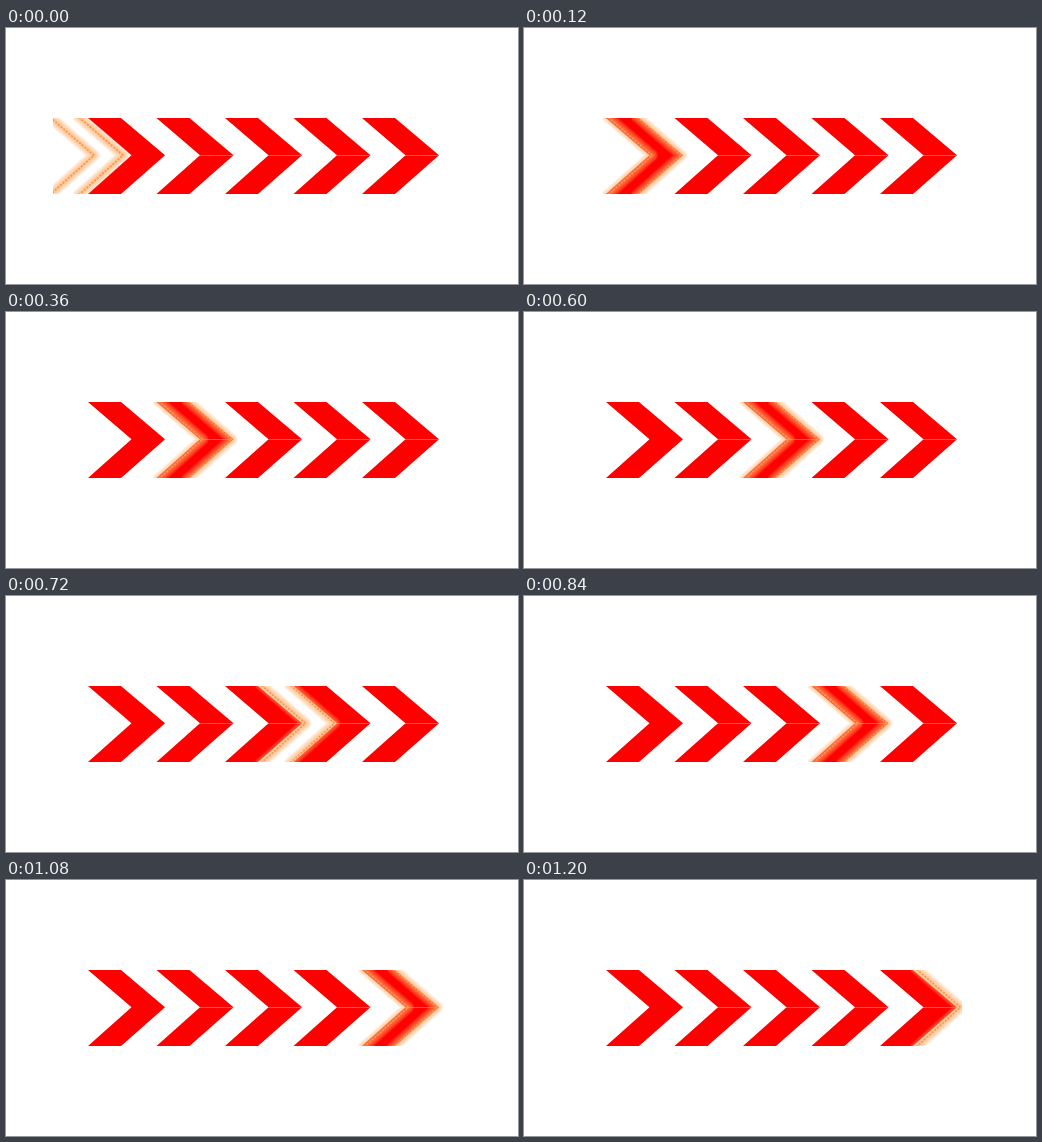
These frames come from a looping animation (512x256 px, 1.32 s). An HTML page with a canvas:

```html
<!DOCTYPE html>
<html>
<head>
<meta charset="utf-8">
<style>
html, body { margin: 0; width: 100%; height: 100%; overflow: hidden; background: #fff; }
canvas { display: block; }
</style>
</head>
<body>
<canvas width="512" height="256"></canvas>
<script>
const ctx = document.querySelector('canvas').getContext('2d');
const TOP = 90, MID = 127.3, BOTTOM = 166;
const PITCH = 68.5, STEP_MS = 120, STEPS = 11;

function chevron(i) {
  const x = 82 + PITCH * i;
  ctx.fillStyle = '#f00';
  ctx.beginPath();
  ctx.moveTo(x, TOP);
  ctx.lineTo(x + 33, TOP);
  ctx.lineTo(x + 77, MID);
  ctx.lineTo(x + 33, BOTTOM);
  ctx.lineTo(x, BOTTOM);
  ctx.lineTo(x + 43.5, MID);
  ctx.fill();
  if (i > 0) {
    ctx.fillStyle = 'rgba(255,255,255,.4)';
    ctx.fillRect(x + 43, 127, 33, 0.8);
  }
}

// Soft orange halo with a dotted core, bent around its tip
function glow(tip) {
  const path = new Path2D();
  path.moveTo(tip - 46.5, TOP - 3);
  path.lineTo(tip, MID);
  path.lineTo(tip - 46.5, BOTTOM + 3);
  ctx.lineJoin = 'round';
  ctx.strokeStyle = 'rgba(255,165,95,.16)';
  for (let w = 12; w > 0; w -= 2) {
    ctx.lineWidth = w;
    ctx.stroke(path);
  }
  ctx.strokeStyle = 'rgb(250,150,80)';
  ctx.lineWidth = 1.8;
  ctx.setLineDash([2, 1.5]);
  ctx.stroke(path);
  ctx.setLineDash([]);
}

function draw(now) {
  const step = Math.floor(now / STEP_MS) % STEPS;
  ctx.fillStyle = '#fff';
  ctx.fillRect(0, 0, 512, 256);
  for (let i = 0; i < 5; i++) chevron(i);

  ctx.save();
  ctx.beginPath();
  ctx.rect(47, TOP, 391, BOTTOM - TOP);
  ctx.clip();
  const tip = step ? 94 + step * PITCH / 2 : 88;
  glow(tip);
  if (step < STEPS - 1) glow(tip + 29);
  ctx.restore();
}

const start = performance.now();
function tick() {
  draw(performance.now() - start);
  requestAnimationFrame(tick);
}
tick();
</script>
</body>
</html>
```
